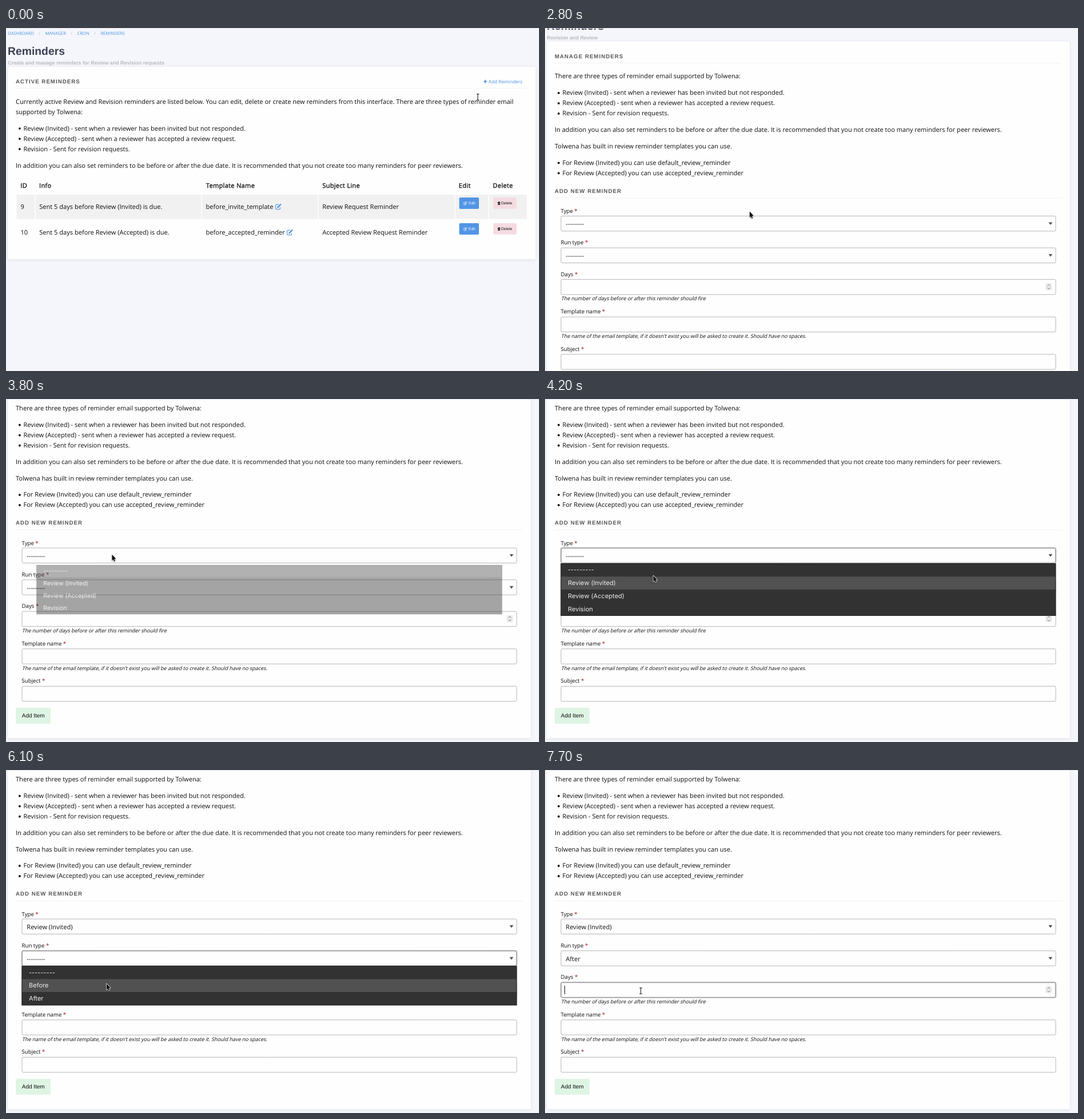
An HTML page with a canvas for the animation above (8 s loop, 932 px wide and 601 px high).

```html
<!DOCTYPE html>
<html lang="en">
<head>
<meta charset="utf-8">
<title>Reminders</title>
<style>
html, body { margin: 0; width: 100%; height: 100%; overflow: hidden; background: #f4f6fb; }
canvas { display: block; }
</style>
</head>
<body>
<canvas id="stage" width="932" height="601"></canvas>
<script>
const W = 932, H = 601, LOOP = 8000, STEP = 100, SCROLL = 112.6;
const stage = document.getElementById('stage').getContext('2d');
const layer = document.createElement('canvas');
layer.width = W;
layer.height = H;
const layerCtx = layer.getContext('2d');
let ctx = stage;

// The page is shown zoomed out, so sizes are CSS pixels times this
const ZOOM = 0.691;
const SANS = '"Open Sans", sans-serif';
const ARIAL = '"Liberation Sans", Arial, sans-serif';
const MENU = 'Inter, sans-serif';
const BODY = 16 * ZOOM, LABEL = 14 * ZOOM, HELP = 13 * ZOOM, CRUMB = 11 * ZOOM;
const INK = '#0d0d0d', BLUE = '#4c91e4', GREY = '#b5b6bc';

// Cursor path: time, x, y
const PATH = [
  [400, 825, 121], [600, 829, 118], [1200, 869, 94], [1800, 869, 94],
  [2400, 357.5, 321], [3000, 357.5, 321], [3400, 185, 272], [3800, 185, 272],
  [4200, 189, 309], [4700, 189, 309], [5200, 172, 335], [5900, 172, 335],
  [6100, 175.5, 374], [6500, 176, 402], [6800, 176, 402], [7000, 174, 394],
  [7100, 174, 394], [7500, 167.5, 387]
];

const clamp = (v, a = 0, b = 1) => Math.min(b, Math.max(a, v));

function cursorAt(t) {
  if (t <= PATH[0][0]) return PATH[0].slice(1);
  for (let i = 1; i < PATH.length; i++) {
    const [t0, x0, y0] = PATH[i - 1], [t1, x1, y1] = PATH[i];
    if (t <= t1) {
      const u = (t - t0) / (t1 - t0), e = u * u * (3 - 2 * u);
      return [x0 + (x1 - x0) * e, y0 + (y1 - y0) * e];
    }
  }
  return PATH[PATH.length - 1].slice(1);
}

function text(str, x, y, size = BODY, color = INK, family = SANS, weight = 400, spacing = 0) {
  ctx.font = `${weight} ${size}px ${family}`;
  ctx.textRendering = 'geometricPrecision';
  ctx.letterSpacing = spacing + 'px';
  ctx.fillStyle = color;
  ctx.fillText(str, x, y);
  return ctx.measureText(str).width;
}

function oblique(str, x, y) {
  ctx.save();
  ctx.transform(1, 0, -0.23, 1, x, y);
  text(str, 0, 0, HELP);
  ctx.restore();
}

function rect(x, y, w, h, color) {
  ctx.fillStyle = color;
  ctx.fillRect(x, y, w, h);
}

function round(x, y, w, h, r, color) {
  ctx.beginPath();
  ctx.roundRect(x, y, w, h, r);
  ctx.fillStyle = color;
  ctx.fill();
}

function poly(points, fill) {
  ctx.beginPath();
  points.forEach(([x, y], i) => i ? ctx.lineTo(x, y) : ctx.moveTo(x, y));
  if (fill) {
    ctx.closePath();
    ctx.fillStyle = fill;
    ctx.fill();
  }
}

function line(points, color, width) {
  poly(points);
  ctx.strokeStyle = color;
  ctx.lineWidth = width;
  ctx.stroke();
}

function bullet(str, y) {
  ctx.beginPath();
  ctx.arc(23.9, y - 3.4, 1.9, 0, 7);
  ctx.fillStyle = INK;
  ctx.fill();
  text(str, 30.5, y);
}

function card(y, w, h) {
  ctx.save();
  ctx.shadowColor = 'rgba(60,70,100,.13)';
  ctx.shadowBlur = 5;
  ctx.shadowOffsetY = 1;
  round(3.5, y, w, h, 2, '#fefefe');
  ctx.restore();
}

function heading(str, y) {
  text(str, 17, y, LABEL, '#565656', ARIAL, 700, 1.04);
}

function pageTop(crumbs, subtitle) {
  let x = 3;
  crumbs.forEach((c, i) => {
    if (i) {
      text('/', x + 8.3, 11.8, CRUMB, '#b9bcc4');
      x += 19.7;
    }
    x += text(c, x, 11.8, CRUMB, BLUE);
  });
  text('Reminders', 3, 47, 28 * ZOOM, '#3d4052', ARIAL, 700);
  text(subtitle, 3.3, 64, 8.95, '#b8b9c0', ARIAL, 700);
}

function typesList(y) {
  bullet('Review (Invited) - sent when a reviewer has been invited but not responded.', y);
  bullet('Review (Accepted) - sent when a reviewer has accepted a review request.', y + 18);
  bullet('Revision - Sent for revision requests.', y + 36);
  text('In addition you can also set reminders to be before or after the due date. ' +
    'It is recommended that you not create too many reminders for peer reviewers.', 17, y + 65);
}

function penIcon(x, y, s, color) {
  ctx.save();
  ctx.translate(x, y);
  ctx.scale(s / 11, s / 11);
  ctx.lineJoin = 'round';
  line([[6.5, 1.8], [1.8, 1.8], [0.7, 2.8], [0.7, 9.2], [1.8, 10.2], [7.8, 10.2], [8.8, 9.2], [8.8, 7]], color, 1.1);
  line([[4.4, 7], [9.3, 2.1]], color, 2.3);
  poly([[3.2, 8.2], [3.6, 5.9], [5.6, 7.8]], color);
  line([[9.2, 0.6], [10.8, 2.2]], color, 1.3);
  ctx.restore();
}

function trashIcon(x, y) {
  rect(x, y + 0.9, 5, 0.8, INK);
  rect(x + 1.6, y, 1.8, 1, INK);
  rect(x + 0.5, y + 2, 4, 3.7, INK);
  for (const dx of [1.3, 2.3, 3.3]) rect(x + dx, y + 2.6, 0.4, 2.4, '#f5dbe1');
}

function headCell(str, x) {
  text(str, x, 279.5, BODY, INK, SANS, 400, 0.3);
  ctx.strokeStyle = INK;
  ctx.lineWidth = 0.3;
  ctx.strokeText(str, x, 279.5);
}

function tableRow(y, id, info, template, subject) {
  text(id, 25.5, y);
  text(info, 58.3, y);
  const w = text(template, 349.5, y);
  penIcon(349.5 + w + 3.2, y - 9.5, 11, BLUE);
  text(subject, 553.2, y);
  round(792.5, y - 20, 34.5, 20, 2, '#5295e5');
  penIcon(800, y - 13, 6.4, '#fff');
  text('Edit', 809, y - 7.6, 9.6 * ZOOM, '#fff', ARIAL);
  round(852, y - 20, 40.8, 19.7, 2, '#f5dbe1');
  trashIcon(859.5, y - 12.8);
  text('Delete', 866, y - 7.6, 9.6 * ZOOM, INK, ARIAL);
}

function listPage(hover) {
  pageTop(['DASHBOARD', 'MANAGER', 'CRON', 'REMINDERS'],
    'Create and manage reminders for Review and Revision requests');
  card(68, 922.5, 337.2);
  heading('ACTIVE REMINDERS', 96.8);
  const link = hover ? '#2a74cf' : BLUE;
  rect(835.2, 92.9, 6, 1.6, link);
  rect(837.4, 90.7, 1.6, 6, link);
  text('Add Reminders', 843.8, 96.6, 12 * ZOOM, link);
  rect(17, 105, 894, 1, '#f1f1f3');
  text('Currently active Review and Revision reminders are listed below. You can edit, delete or ' +
    'create new reminders from this interface. There are three types of reminder email', 17, 133);
  text('supported by Tolwena:', 17, 150.6);
  typesList(179.5);
  const heads = { ID: 25.3, Info: 58, 'Template Name': 349.8, 'Subject Line': 553.2, Edit: 791.8, Delete: 851.3 };
  for (const name in heads) headCell(name, heads[name]);
  const edges = [18.5, 51.5, 342.5, 546.5, 785.5, 844.8, 912.3];
  for (let i = 0; i < 6; i++) {
    rect(edges[i], 292, edges[i + 1] - edges[i] - 1.5, 42.5, '#f1f1f1');
  }
  tableRow(317, '9', 'Sent 5 days before Review (Invited) is due.', 'before_invite_template', 'Review Request Reminder');
  tableRow(362, '10', 'Sent 5 days before Review (Accepted) is due.', 'before_accepted_reminder', 'Accepted Review Request Reminder');
}

function label(str, y) {
  const w = text(str, 27.5, y, LABEL);
  text('*', 27.5 + w + 2.5, y, LABEL, '#a80f0f');
}

function box(y, focus = 0) {
  ctx.beginPath();
  ctx.roundRect(28, y, 865, 26.4, 2);
  ctx.fillStyle = '#fefefe';
  ctx.fill();
  ctx.lineWidth = 1;
  ctx.strokeStyle = GREY;
  ctx.stroke();
  if (focus > 0) {
    ctx.save();
    ctx.globalAlpha = focus;
    ctx.shadowColor = '#cacaca';
    ctx.shadowBlur = 3.5;
    ctx.strokeStyle = '#7e7e82';
    ctx.stroke();
    ctx.restore();
  }
}

function select(y, value, focus) {
  box(y, focus);
  text(value, 36.3, y + 18);
  poly([[880.6, y + 11], [887.2, y + 11], [883.9, y + 15.6]], '#4d4d4d');
}

function spinner(y) {
  round(875.3, y, 11.2, 12.4, 1.5, '#ebebee');
  line([[878.4, y + 4.6], [880.9, y + 2.3], [883.4, y + 4.6]], '#77777c', 1);
  line([[878.4, y + 7.9], [880.9, y + 10.2], [883.4, y + 7.9]], '#77777c', 1);
}

// Fades a focus ring in from one time and out from another
const ring = (t, from, to = Infinity) => clamp((t - from + 100) / 200) * (1 - clamp((t - to + 100) / 200));

function formPage(t) {
  pageTop(['DASHBOARD', 'MANAGER', 'CRON', 'REMINDERS', 'ADD NEW REMINDER'], 'Revision and Review');
  card(68, 914.3, 639);
  heading('MANAGE REMINDERS', 96.8);
  rect(17, 105, 887, 1, '#f1f1f3');
  text('There are three types of reminder email supported by Tolwena:', 17, 132.6);
  typesList(161.5);
  text('Tolwena has built in review reminder templates you can use.', 17, 255.6);
  bullet('For Review (Invited) you can use default_review_reminder', 284);
  bullet('For Review (Accepted) you can use accepted_review_reminder', 302);
  heading('ADD NEW REMINDER', 333);
  rect(17, 341.6, 887, 1, '#f1f1f3');

  const none = '---------';
  label('Type', 368.4);
  select(373.6, t < 4800 ? none : 'Review (Invited)', ring(t, 3900, 5700));
  label('Run type', 423.6);
  select(429.4, t < 6900 ? none : 'After', ring(t, 5700, 7500));
  label('Days', 478.9);
  box(484.8, ring(t, 7500));
  spinner(491.3);
  if (t >= 7500) rect(34, 490.6, 1, 15, INK);
  oblique('The number of days before or after this reminder should fire', 28, 521.6);
  label('Template name', 544.4);
  box(550.4);
  oblique("The name of the email template, if it doesn't exist you will be asked to create it. Should have no spaces.", 28, 587.2);
  label('Subject', 610);
  box(615.9);
  round(17, 653.7, 61, 28, 2, '#dff5e4');
  text('Add Item', 27.8, 671, 14.4 * ZOOM, INK, ARIAL);
}

function popup(t, open, close, top, items, cursorY) {
  if (t < open || t > close) return;
  const rowH = 22.85, h = items.length * rowH + 0.6;
  const active = clamp(Math.floor((cursorY + 2.5 - top) / rowH), 0, items.length - 1);

  // Painted opaque on a layer, so that it fades as one piece
  ctx = layerCtx;
  ctx.clearRect(0, 0, W, H);
  rect(27.5, top, 865.8, h, '#323232');
  rect(28, top + active * rowH + 0.3, 865, 22.7, '#515151');
  ctx.strokeStyle = '#1d1d1d';
  ctx.lineWidth = 0.8;
  ctx.strokeRect(27.9, top + 0.4, 865, h - 0.8);
  items.forEach((s, i) => text(s, 40, top + 15.4 + i * rowH, 11, '#eeeeee', MENU, 400, 0.04));
  ctx = stage;

  const opening = t < open + STEP, size = opening ? 0.94 : 1;
  const cx = 460.5, cy = top + h / 2;
  ctx.save();
  ctx.globalAlpha = opening || t >= close ? 0.44 : 1;
  ctx.translate(cx, cy);
  ctx.scale(size, size);
  ctx.drawImage(layer, -cx, -cy);
  ctx.restore();
}

function outlined(points) {
  poly(points);
  ctx.closePath();
  ctx.lineJoin = 'round';
  ctx.strokeStyle = '#fff';
  ctx.lineWidth = 1.5;
  ctx.stroke();
  ctx.fillStyle = '#111';
  ctx.fill();
}

function drawCursor(kind, x, y) {
  ctx.save();
  ctx.translate(x, y);
  if (kind === 'beam') {
    for (const [c, w] of [['#fff', 2.4], ['#222', 1.1]]) {
      line([[0, -5], [0, 5]], c, w);
      line([[-2.4, -5.2], [2.4, -5.2]], c, w);
      line([[-2.4, 5.2], [2.4, 5.2]], c, w);
    }
  } else {
    ctx.shadowColor = 'rgba(0,0,0,.25)';
    ctx.shadowBlur = 2;
    ctx.shadowOffsetY = 1;
    if (kind === 'hand') {
      outlined([[-1, -3], [1, -3], [1, 2], [5.5, 3], [6, 5], [5, 10], [-1, 10], [-4, 5], [-3, 4], [-1, 6]]);
    } else {
      outlined([[0.4, 0.6], [0.4, 11], [2.6, 8.9], [4.1, 12.4], [5.8, 11.6], [4.3, 8.3], [7.3, 8.1]]);
    }
  }
  ctx.restore();
}

function cursorKind(t, x, y) {
  if (t < 1700) {
    if (y > 119) return 'beam';
    return x > 835 && y < 101 ? 'hand' : 'arrow';
  }
  return t >= 7200 ? 'beam' : 'arrow';
}

function draw(t) {
  const [cx, cy] = cursorAt(t);
  const kind = cursorKind(t, cx, cy);
  rect(0, 0, W, H, '#f4f6fb');
  if (t < 1700) {
    listPage(kind === 'hand');
  } else {
    const u = clamp((t - 2700) / 400);
    ctx.save();
    ctx.translate(0, -SCROLL * (1 - Math.pow(1 - u, 1.73)));
    formPage(t);
    ctx.restore();
    popup(t, 3800, 4800, 288, ['---------', 'Review (Invited)', 'Review (Accepted)', 'Revision'], cy);
    popup(t, 5500, 6900, 343.2, ['---------', 'Before', 'After'], cy);
    if (t < 1900) {
      round(-4, 594.5, 19, 12, 3, '#2b2a33');
      text('t.', 2, 603, 8, '#e8e8ea');
    }
  }
  rect(0, 0, W, 1, '#e4e6ec');
  drawCursor(kind, cx, cy);
}

const start = performance.now();
function frame() {
  const t = (performance.now() - start) % LOOP;
  draw(Math.floor(t / STEP) * STEP);
  requestAnimationFrame(frame);
}
frame();
</script>
</body>
</html>
```
